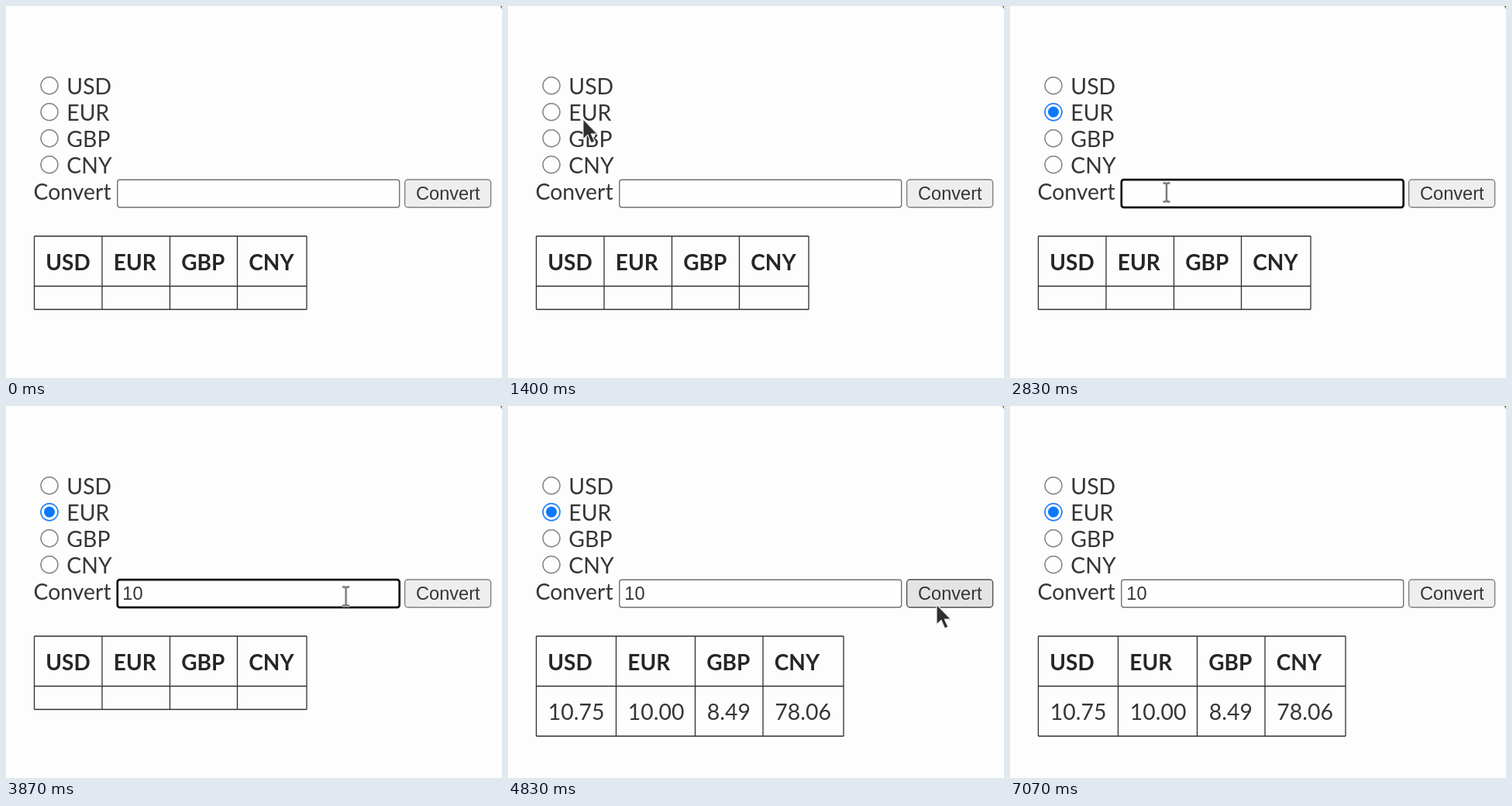
Write an HTML page that moves like this. It is 640 px wide and 480 px high and loops after 7.14 s.

```html
<!DOCTYPE html>
<html lang="en">
<head>
<meta charset="utf-8">
<title>Currency converter</title>
<style>
  html, body { margin: 0; width: 100%; height: 100%; overflow: hidden; background: #fdfdfd; }
  svg { display: block; width: 640px; height: 480px; }
  text { font: 28.4px Lato, sans-serif; fill: #363636; }
  .head { font-size: 28px; font-weight: 700; fill: #262626; }
  .ui { font: 23.6px "Liberation Sans", Arial, sans-serif; }
  .grid { fill: none; stroke: #303030; stroke-width: 1.3; }
  .ring { fill: #fefefe; stroke: #858585; stroke-width: 1.5; }
  .ring.on { stroke: #2583f5; stroke-width: 1.7; }
  .field { fill: #fefefe; stroke: #707070; stroke-width: 1.4; }
  .field.focus { stroke: #101010; stroke-width: 2.7; }
  .button { fill: #eeeeee; stroke: #808080; stroke-width: 1.4; }
  .button.hover { fill: #e4e4e4; stroke: #505050; }
  .button.down { fill: #f4f4f4; }
</style>
</head>
<body>
<svg viewBox="0 0 640 480">
  <path d="M637.5 0H640V4Z" fill="#a07a1c"/>
  <g id="form"></g>
  <text x="35.5" y="249.8">Convert</text>
  <rect id="field" class="field" x="143.8" y="224.2" width="363.9" height="35.6" rx="3"/>
  <text id="amount" class="ui" x="150.3" y="250.3"></text>
  <rect id="caret" y="229" width="1.8" height="26" fill="#222"/>
  <rect id="button" class="button" x="514.6" y="224" width="111" height="35.8" rx="4"/>
  <text class="ui" x="570.3" y="250.3" text-anchor="middle">Convert</text>
  <g id="empty"></g>
  <g id="full"></g>
  <g id="pointer">
    <path id="arrow" d="M0 0V26L6 20.5L10.6 31L15 29L10.4 19.2H18.5Z" fill="#303030" stroke="#f0f0f0" stroke-width="1.2" stroke-linejoin="round"/>
    <g id="beam" fill="none">
      <path d="M-4.5-12H-1.5L0-10.5L1.5-12H4.5M0-10.5V10.5M-4.5 12H-1.5L0 10.5L1.5 12H4.5" stroke="#e2e2e2" stroke-width="4"/>
      <path d="M-4.5-12H-1.5L0-10.5L1.5-12H4.5M0-10.5V10.5M-4.5 12H-1.5L0 10.5L1.5 12H4.5" stroke="#6c6c6c" stroke-width="1.8"/>
    </g>
  </g>
</svg>
<script>
const LOOP = 7140;
const CODES = ['USD', 'EUR', 'GBP', 'CNY'];
const RATES = ['10.75', '10.00', '8.49', '78.06'];
const CHECK = 1560, FOCUS = 2100, TYPE1 = 2970, TYPE2 = 3200, PRESS = 4250, CLICK = 4330;
const SHOW = 560, HIDE = 6260;

// time, x, y
const PATH = [
  [560, 102, 480], [760, 109, 400], [1010, 145, 285], [1250, 110, 175],
  [1400, 97, 146], [1500, 90, 138], [1600, 90, 138], [1850, 140, 195],
  [2100, 202, 240.5], [3480, 202, 240.5], [3680, 320, 243], [3870, 438, 245.5],
  [4020, 516, 252], [4170, 553, 256], [5690, 553, 256], [5860, 465, 304],
  [6030, 367, 353], [6260, 325, 364]
];

const $ = id => document.getElementById(id);
const text = (x, y, s, cls = '') => `<text class="${cls}" x="${x}" y="${y}">${s}</text>`;

function table(xs, bottom, values) {
  const left = xs[0], right = xs[4];
  let d = [297, 361.5, bottom].map(y => `M${left} ${y}H${right}`).join('');
  d += xs.map(x => `M${x} 297V${bottom}`).join('');
  return `<path class="grid" d="${d}"/>` + CODES.map((code, i) =>
    text(xs[i] + 14.8, 340.6, code, 'head') +
    (values ? text(xs[i] + 15.3, 405, values[i]) : '')).join('');
}

$('form').innerHTML = CODES.map((code, i) =>
  `<circle class="ring" cx="56" cy="${102.8 + 34 * i}" r="11"/>` +
  text(78.3, 113.8 + 34 * i, code)).join('') +
  '<circle id="dot" cx="56" cy="136.8" r="7" fill="#0a78fa"/>';
$('empty').innerHTML = table([36.5, 124, 211.5, 298.5, 388], 391.5);
$('full').innerHTML = table([36.5, 139.5, 241.5, 329, 433], 426, RATES);
const eurRing = document.querySelectorAll('.ring')[1];

const same = (a, b) => a[1] === b[1] && a[2] === b[2];

function slope(i, k) {
  const a = PATH[i - 1], b = PATH[i], c = PATH[i + 1];
  if (!a || !c || same(a, b) || same(b, c)) return 0;
  return (c[k] - a[k]) / (c[0] - a[0]);
}

// Smooth curve through the path, at rest where it pauses
function pointAt(t) {
  let i = 0;
  while (i < PATH.length - 2 && t >= PATH[i + 1][0]) i++;
  const a = PATH[i], b = PATH[i + 1], span = b[0] - a[0];
  const u = Math.max(0, Math.min(1, (t - a[0]) / span)), v = 1 - u;
  return [1, 2].map(k =>
    a[k] * v * v * (1 + 2 * u) + b[k] * u * u * (3 - 2 * u) +
    span * u * v * (slope(i, k) * v - slope(i + 1, k) * u));
}

const show = (node, on) => node.setAttribute('visibility', on ? 'visible' : 'hidden');

function draw(t) {
  const [x, y] = pointAt(t);
  const inBox = (l, r) => x >= l && x <= r && y >= 223 && y <= 261;
  const visible = t >= SHOW && t < HIDE;
  const beam = inBox(143, 508);
  $('pointer').setAttribute('transform', `translate(${x.toFixed(1)} ${y.toFixed(1)})`);
  show($('arrow'), visible && !beam);
  show($('beam'), visible && beam);

  const checked = t >= CHECK;
  eurRing.classList.toggle('on', checked);
  show($('dot'), checked);

  const focus = t >= FOCUS && t < PRESS;
  const value = t >= TYPE2 ? '10' : t >= TYPE1 ? '1' : '';
  const since = t >= TYPE2 ? TYPE2 : t >= TYPE1 ? TYPE1 : FOCUS;
  $('field').classList.toggle('focus', focus);
  $('amount').textContent = value;
  $('caret').setAttribute('x', 150.5 + 13 * value.length);
  show($('caret'), focus && (t - since) % 1000 < 500);

  $('button').classList.toggle('hover', visible && inBox(514, 626));
  $('button').classList.toggle('down', t >= PRESS && t < CLICK);
  show($('empty'), t < CLICK);
  show($('full'), t >= CLICK);
}

const start = performance.now();
function tick() {
  draw((performance.now() - start) % LOOP);
  requestAnimationFrame(tick);
}
tick();
</script>
</body>
</html>
```
